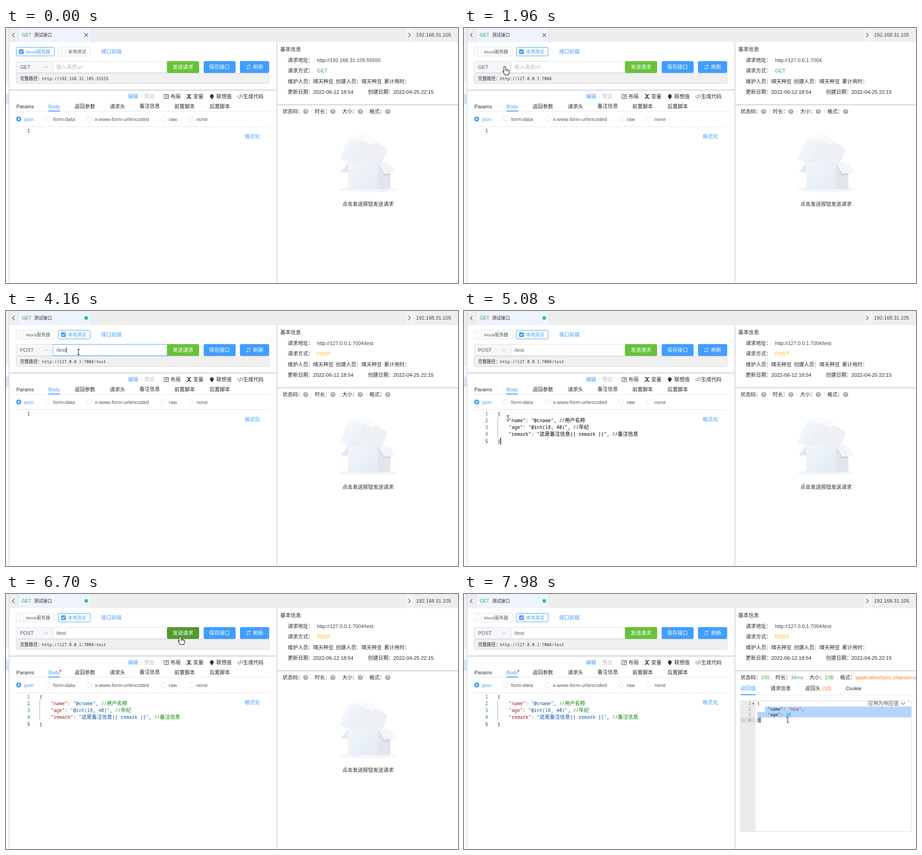
An HTML page for the animation above (8000 ms loop, 997 px wide and 562 px high).

```html
<!DOCTYPE html>
<html lang="zh">
<head>
<meta charset="utf-8">
<title>接口测试</title>
<style>
html, body { margin: 0; width: 100%; height: 100%; overflow: hidden; background: #fff; }
svg { display: block; width: 100vw; height: 100vh; }
text { font-family: "Liberation Sans", "Noto Sans CJK SC", "Noto Sans CJK", sans-serif; white-space: pre; }
.mono { font-family: "Noto Sans Mono", "Liberation Mono", "Noto Sans CJK SC", "Noto Sans CJK", monospace; }
.k { fill: #a31515; } .s { fill: #0451a5; } .c { fill: #008000; } .num { fill: #1c7fc4; }
.plain tspan { fill: #000; }
</style>
</head>
<body>
<svg id="stage" viewBox="0 0 997 562" preserveAspectRatio="none"></svg>
<script>
const LOOP = 8000;
const BLUE = '#409eff', INK = '#26282b', GREY = '#56595f', PALE = '#c0c4cc', LINE = '#dcdfe6',
      GREEN = '#32a852', ORANGE = '#ff7a20', AMBER = '#fdb714';

// Markup helpers; text is placed by its vertical middle.
const text = (x, mid, str, fill = INK, size = 11.25, extra = '') =>
  `<text x="${x}" y="${mid + size * .36}" font-size="${size}" fill="${fill}" ${extra}>${str}</text>`;
const mono = (x, mid, str, fill, size, extra = '') => text(x, mid, str, fill, size, 'class="mono" ' + extra);
const rect = (x, y, w, h, fill, extra = '') =>
  `<rect x="${x}" y="${y}" width="${w}" height="${h}" fill="${fill}" ${extra}/>`;
const path = (d, stroke, width = 1, fill = 'none', extra = '') =>
  `<path d="${d}" stroke="${stroke}" stroke-width="${width}" fill="${fill}" ${extra}/>`;
const poly = (points, fill) => `<polygon points="${points}" fill="${fill}"/>`;
const circle = (x, y, r, fill, extra = '') => `<circle cx="${x}" cy="${y}" r="${r}" fill="${fill}" ${extra}/>`;
const group = (id, body) => `<g id="${id}">${body}</g>`;
const row = (mid, items) => items.map(([x, str, fill]) => text(x, mid, str, fill)).join('');
const bars = (mid, xs) => xs.map(x => path(`M${x} ${mid - 5}v10`, LINE)).join('');
const caret = (id, x, y, h, w = 1) => rect(x, y, w, h, '#000', `id="${id}"`);

// Code line: parts are [class, text]; wide characters get a larger size.
const code = (x, mid, parts, size = 10.3) => mono(x, mid, parts.map(([cls, str]) =>
  str.split(/([\u4e00-\u9fff]+)/).filter(Boolean).map(s =>
    `<tspan class="${cls}" ${/[\u4e00-\u9fff]/.test(s) ? 'font-size="11.25"' : ''}>${s}</tspan>`).join('')
).join(''), '#111', size);

const checkbox = (id, x, w, label, on) => group(id,
  rect(x + .5, 42.5, w, 19, '#fff', `rx="2" stroke="${on ? BLUE : LINE}"`) +
  rect(x + 7, 47.5, 9.5, 9.5, on ? BLUE : '#fff', `rx="1.5" stroke="${on ? BLUE : LINE}"`) +
  (on ? path(`M${x + 9} 52l2 2 3.6-4`, '#fff', 1.3) : '') +
  text(x + 22, 52, label, on ? BLUE : GREY, 9.9));

const radio = (x, label, on) =>
  circle(x, 200.5, 5.5, on ? BLUE : '#fff', on ? '' : `stroke="${LINE}"`) +
  (on ? circle(x, 200.5, 2, '#fff') : '') + text(x + 12, 200.5, label, on ? BLUE : GREY);

const button = (x, w, label, tx, fill, id = '') =>
  rect(x, 73, w, 26, fill, `rx="3" id="${id}"`) + text(tx, 86, label, '#fff', 11.4, 'font-weight="500"');

const help = x => circle(x, 184, 5.6, '#a3a8b0') +
  text(x, 184.2, '?', '#fff', 9, 'text-anchor="middle" font-weight="700"');

function header() {
  return rect(0, 0, 997, 31, '#eeeeef') + rect(27, 0, 160, 31, '#eff3fd') +
    path('M187.5 0V31M26.5 0V31', '#dcdfe8') +
    path('M18.5 11l-4.5 4.5 4.5 4.5', '#555', 1.2) +
    text(35, 15, 'GET', GREEN, 10, 'font-weight="500"') + text(62, 15, '测试接口', INK, 9.8) +
    group('closeTab', path('M173 11.5l8 8m0-8l-8 8', '#555', 1.1)) +
    group('dirtyTab', circle(177, 15.3, 4, '#2fc27b')) +
    rect(880, 0, 20, 31, '#f3f3f4') + path('M879.5 0V31', '#d9dbe0') + path('M887.5 11l4.5 4.5-4.5 4.5', '#555', 1.2) +
    text(904.5, 15.3, '192.168.31.105', '#444', 11.15) +
    rect(0, 0, 6, 120, '#f0f1f3') + rect(0, 145, 6, 23, '#d3e7fc') + path('M6.5 0V562', '#cfd3db', 1.4);
}

function requestBar() {
  return checkbox('mockOn', 22, 84, 'Mock服务器', true) + checkbox('mockOff', 22, 84, 'Mock服务器', false) +
    checkbox('localOff', 115, 70, '本地测试', false) + checkbox('localOn', 115, 70, '本地测试', true) +
    text(210, 52, '接口前缀', BLUE) +
    rect(22.5, 99.5, 558, 23, '#f0f0f0', 'rx="3" stroke="#d5d8dd"') +
    text(31, 112, '完整路径：', INK, 9.7) + mono(79.5, 112, '', '#333', 9.05, 'id="fullPath"') +
    rect(103.5, 73.5, 252, 25, '#fff', `id="urlBox" stroke="${LINE}"`) +
    rect(22.5, 73.5, 80.5, 25, '#f5f7fa', `id="methodBox" rx="2" stroke="${LINE}"`) +
    text(31, 86, '', GREY, 11, 'id="method"') + path('M84.5 84l4 4 4-4', PALE, 1.1) +
    text(111, 86, '输入请求url', '#b4b8c0', 11.25, 'id="hint"') + text(111, 86, '', GREY, 11.25, 'id="url"') +
    caret('urlCaret', 111, 80, 12) +
    button(355, 71, '发送请求', 367.5, '#67c23a', 'send') + button(436, 70.5, '保存接口', 448, BLUE) +
    button(516, 64.5, '刷新', 545, BLUE) +
    path('M531 85a4 4 0 0 1 7-1.6m.4-2.2v2.6h-2.6M538.6 87a4 4 0 0 1-7 1.6m-.4 2.2v-2.6h2.6', '#fff');
}

function toolbar() {
  return row(151, [[269, '编辑', BLUE], [305, '预览', '#b8bcc4'], [363, '布局'], [413, '变量'], [464, '联想值'], [523, '生成代码']]) +
    bars(151, [298.5]) + path('M348.5 146.5h10v9h-10zM353 146.5v9M353 150h5.5', '#444') +
    path('M399.5 147q3-1.5 3.5 1l1.5 5q1 3 4 1M408.5 147q-2-1-4 2l-2 4q-2 3-4 2', '#222', 1.7) +
    path('M454 146a4.3 4.3 0 0 1 2 8v2h-4v-2a4.3 4.3 0 0 1 2-8z', 'none', 0, '#333') +
    path('M514 147.5l-3 3.5 3 3.5M519.5 147.5l3 3.5-3 3.5M518 146l-2.5 10', '#444') +
    path('M22 183.5H580.5', '#e4e7ed') + rect(93.5, 182, 25.5, 2, BLUE) +
    row(173, [[23, 'Params'], [93.5, 'Body', BLUE], [151.5, '返回参数'], [229, '请求头'], [371.5, '前置脚本'], [449, '后置脚本']]) +
    text(294.5, 172, '备注信息') + group('bodyDot', circle(120, 169, 2.3, '#f56c6c')) +
    radio(28, 'json', true) + radio(92, 'form-data') + radio(184, 'x-www-form-urlencoded') + radio(347, 'raw') + radio(408, 'none') +
    path('M22 217.5H580.5', '#cfcfcf', 1, 'none', 'stroke-dasharray="3 2"') + text(526.5, 239, '格式化', BLUE);
}

const lineMid = n => 226 + 15.2 * (n - 1);

function bodyCode() {
  const lines = [
    [['', '{']],
    [['k', '    "name"'], ['', ': '], ['s', '"@cname"'], ['', ', '], ['c', '//用户名称']],
    [['k', '    "age"'], ['', ': '], ['s', '"@int(18, 40)"'], ['', ', '], ['c', '//年纪']],
    [['k', '    "remark"'], ['', ': '], ['s', '"这是备注信息{{ remark }}"'], ['', ', '], ['c', '//备注信息']],
    [['', '}']]
  ];
  return mono(46.8, 226, '1', '#0b216f', 10.3, 'id="firstNo"') +
    group('body', lines.map((parts, i) => code(74, lineMid(i + 1), parts) +
      (i ? mono(46.8, lineMid(i + 1), i + 1, i === 4 ? '#0b216f' : '#237893', 10.3) : '')).join('') +
      path('M74.5 233.5V279', '#a5a5a5')) +
    caret('bodyCaret', 74, 219, 15, 1.5);
}

function info() {
  const who = '晴天种豆';
  return path('M7 136.7H597M598 169.3H997', '#cbd0d7', 2) + path('M597.5 31V562', '#cbd0d7', 1.6) +
    text(605, 47, '基本信息', INK, 11.4, 'font-weight="500"') +
    text(621.5, 71, '请求地址：') + text(686, 71, '', '#444', 11.25, 'id="address"') +
    text(621.5, 94, '请求方式：') + text(686, 94, '', GREEN, 11.25, 'id="verb"') +
    row(117.5, [[621.5, '维护人员：'], [677.5, who], [727.5, '创建人员：'], [784, who], [834, '累计用时：']]) +
    row(141, [[621.5, '更新日期：'], [677.5, '2022-06-12 18:54'], [798.5, '创建日期：'], [854.5, '2022-04-25 22:15']]);
}

function emptyState() {
  return group('empty',
    row(184, [[610, '状态码：'], [681, '时长：'], [741.5, '大小：'], [801.5, '格式：']]) +
    bars(184, [674, 735, 795]) + [661, 721, 781.5, 842].map(help).join('') +
    '<ellipse cx="798" cy="356" rx="63" ry="6" fill="#f3f5f9"/>' +
    poly('757,243 778,235 800,236 815,245 812,262 785,247', '#f9fafc') +
    poly('736,289 748,257 757,243 785,247 776,297 757,297', 'url(#lid)') +
    poly('785,247 809,259 814,250 838,264 841,272 830,297 776,297', '#eef0f5') +
    poly('755,297 738,318 755,319', '#e6e9ef') + poly('755,297 821,297 821,355 755,355', 'url(#front)') +
    poly('821,297 848,318 848,355 821,355', '#e2e5eb') + poly('821,297 848,319 848,324 833,326', '#d3d7df') +
    poly('821,297 845,297 861,318 834,321', '#f4f5f8') +
    text(742, 387.5, '点击发送按钮发送请求', INK, 11.3));
}

const REPLY = { x: 646.5, top: 236, step: 12, char: 5.75, size: 9.58, lens: [1, 18, 13, 1] };

function reply() {
  const { x, top, step, size } = REPLY;
  const rowTop = n => top + step * (n - 1), mid = n => rowTop(n) + step / 2;
  const lines = [
    [['', '{']], [['', '    "name": '], ['k', '"nia"'], ['', ',']], [['', '    "age": '], ['num', '20']], [['', '}']]
  ];
  return group('reply',
    row(184, [[610, '状态码：'], [655, '200', GREEN], [687, '时长：'], [721, '34ms', GREEN], [762, '大小：'],
      [796, '23B', GREEN], [829.5, '格式：'], [863, 'application/json; charset=utf-8', ORANGE]]) +
    bars(184, [680, 755, 823]) +
    row(208, [[610, '返回值', BLUE], [676, '请求信息'], [752.5, '返回头'], [790, '(10)', ORANGE], [842, 'Cookie']]) +
    path('M610 222.5H987', '#e4e7ed') + rect(610, 221, 33, 2, BLUE) +
    rect(610.5, 235.5, 376.5, 288, '#fff', 'rx="2" stroke="#d4d7de"') + rect(611, 236, 32, 287, '#ebebeb') +
    rect(611, top, 32, step, '#dadada', 'id="activeLine"') +
    lines.map((parts, i) => rect(0, rowTop(i + 1), 0, step, '#b5d5ff', `id="mark${i + 1}"`) +
      mono(633, mid(i + 1), i + 1, '#888', size, 'text-anchor="end"') + code(x, mid(i + 1), parts, size)).join('') +
    poly('635.5,240.5 640.5,240.5 638,244', '#666') +
    text(891, 241, '应用为响应值', GREY, 11.3) + path('M964 239l4.5 4.5 4.5-4.5', '#666', 1.1) +
    caret('replyCaret', 0, 0, step, 1.5));
}

function overlays() {
  const card = 'rx="3" stroke="#e4e7ed" filter="url(#shade)"';
  const items = ['GET', 'POST', 'PUT', 'DELETE', 'PATCH'];
  return group('tip', rect(132, 9, 105, 25, '#fff', card) + text(138.5, 21.5, 'http://127.0.0.1:7004', GREY, 10)) +
    group('menu', rect(23, 111, 93, 173, '#fff', card) + poly('57,111.5 62.5,105.5 68,111.5', '#fff') +
      rect(23.5, 0, 92, 33, '#f5f7fa', 'id="menuHover"') +
      items.map((s, i) => text(36, 133 + 33 * i, s, i ? GREY : BLUE, 11)).join('')) +
    group('hand', path('M0 0c1.6 0 2 1 2 2v5l1.5-.5 1.5.8 1.7-.2 1.2 1.2c2 0 2.2 1 2.2 3 0 3-1.6 4-1.6 7.2H0c0-2-3.5-5-4.2-7.5-.4-1.5 1-2 2.2-.6V2C-2 1-1.6 0 0 0z', '#111', 1.1, '#fff') +
      path('M2.2 8v2.5M5 8v2.5M7.6 8.5v2', '#111', .9)) +
    group('arrow', path('M0 0v15l3.5-3.2 2.3 5.4 2.3-1-2.3-5.2h5z', '#111', 1, '#fff')) +
    group('beam', path('M-2.5-5.5h2l.5.5.5-.5h2M0-5V5.5M-2.5 6h2l.5-.5.5.5h2', '#111', 1.1));
}

const defs = `<defs>
  <linearGradient id="lid" x2="1" y2="1"><stop stop-color="#fafbfd"/><stop offset=".55" stop-color="#edf4fa"/><stop offset="1" stop-color="#e9ecf2"/></linearGradient>
  <linearGradient id="front" x2="1" y2="1"><stop stop-color="#f4f6f9"/><stop offset=".5" stop-color="#e9f1f8"/><stop offset="1" stop-color="#e6e9f0"/></linearGradient>
  <filter id="shade" x="-20%" y="-40%" width="140%" height="180%"><feDropShadow dx="0" dy="1" stdDeviation="4" flood-opacity=".12"/></filter></defs>`;
const stage = document.getElementById('stage');
stage.innerHTML = defs + rect(0, 0, 997, 562, '#fff') + header() + requestBar() + toolbar() + bodyCode() +
  info() + emptyState() + reply() + overlays();

const el = {};
stage.querySelectorAll('[id]').forEach(node => { el[node.id] = node; });
const show = (id, on) => el[id].setAttribute('opacity', +on);
const put = (id, attrs) => { for (const key in attrs) el[id].setAttribute(key, attrs[key]); };
const write = (id, str) => { if (el[id].textContent !== str) el[id].textContent = str; };
const ramp = (t, from, to) => Math.min(1, Math.max(0, (t - from) / (to - from)));
const blink = (t, since) => Math.floor((t - since) / 500) % 2 === 0;

// Pointer stops: time, x, y, shape from here on.
const MOVES = [
  [0, 1010, 30, 'arrow'], [80, 1010, 30, 'arrow'], [100, 994, 37, 'arrow'], [260, 994, 37, 'arrow'],
  [320, 965, 50, 'arrow'], [400, 898, 66, 'arrow'], [500, 760, 86, 'arrow'], [600, 590, 106, 'arrow'],
  [720, 370, 112, 'arrow'], [820, 220, 106, 'arrow'], [900, 118, 82, 'beam'], [950, 116, 70, 'arrow'],
  [980, 138, 60, 'hand'], [1020, 157, 58, 'hand'], [1700, 157, 58, 'hand'], [1800, 130, 67, 'arrow'],
  [1880, 100, 79, 'hand'], [1960, 90, 85, 'hand'], [2280, 90, 85, 'hand'], [2400, 84, 115, 'hand'],
  [2600, 78, 160, 'hand'], [2800, 78, 160, 'arrow'], [2880, 115, 122, 'arrow'], [2930, 144, 99, 'beam'],
  [2980, 160, 90, 'beam'], [3280, 160, 90, ''], [4160, 160, 90, 'beam'], [4280, 160, 105, 'arrow'],
  [4460, 136, 170, 'arrow'], [4580, 110, 217, 'beam'], [4700, 97, 236, 'beam'], [5460, 97, 236, 'beam'],
  [5700, 200, 235, 'beam'], [5860, 295, 217, 'arrow'], [6060, 344, 170, 'arrow'], [6180, 372, 130, 'arrow'],
  [6260, 382, 104, 'arrow'], [6420, 384, 100, 'arrow'], [6580, 384, 98, 'hand'], [6660, 384, 93, 'hand'],
  [7180, 384, 93, 'hand'], [7240, 426, 112, 'arrow'], [7380, 560, 192, 'arrow'], [7480, 642, 246, 'beam'],
  [7560, 663, 254, 'beam'], [7660, 663, 254, 'beam'], [7820, 690, 265, 'beam'], [7960, 714, 277, 'beam'],
  [LOOP, 714, 277, 'beam']
];

function pointer(t) {
  const i = Math.max(1, MOVES.findIndex(m => m[0] > t));
  const [t0, x0, y0, shape] = MOVES[i - 1], [t1, x1, y1] = MOVES[i], p = ramp(t, t0, t1);
  return { x: x0 + (x1 - x0) * p, y: y0 + (y1 - y0) * p, shape };
}

const KEYS = [[3320, '/'], [3420, '/t'], [3640, '/te'], [3780, '/tes'], [3900, '/test']];

// Drag selection in the reply follows the pointer.
function select(t, at) {
  const { x, top, step, char, lens } = REPLY;
  const picking = t >= 7620;
  const line = picking ? Math.min(4, Math.max(2, Math.floor((at.y - top) / step) + 1)) : 1;
  const head = x + char * Math.min(lens[line - 1], Math.round((at.x - x) / char));
  const y = top + step * (line - 1);
  put('activeLine', { y });
  put('replyCaret', { x: head, y });
  show('replyCaret', picking);
  for (let n = 1; n <= 4; n++) {
    const from = n === 2 ? x + 3 * char : x, to = n < line ? 986.5 : head;
    const on = picking && n >= 2 && n <= line;
    put('mark' + n, { x: from, width: on ? Math.max(0, to - from) : 0 });
  }
}

function draw(t) {
  const local = t >= 1380, post = t >= 2760, pasted = t >= 5080, done = t >= 7000;
  const typed = KEYS.reduce((s, [at, str]) => t >= at ? str : s, '');
  const address = 'http://' + (local ? '127.0.0.1:7004' : '192.168.31.105:55555') + typed;
  const method = post ? 'POST' : 'GET';
  const at = pointer(t);

  const swap = ramp(t, 1360, 1440);
  show('mockOn', 1 - swap); show('mockOff', swap);
  show('localOff', 1 - swap); show('localOn', swap);
  show('tip', ramp(t, 1110, 1180) * (1 - ramp(t, 1700, 1840)));
  write('fullPath', address); write('address', address);

  write('method', method); write('verb', method);
  put('verb', { fill: post ? AMBER : GREEN });
  put('methodBox', { stroke: t >= 2120 && t < 3200 ? BLUE : LINE });
  show('menu', ramp(t, 2120, 2320) * (1 - ramp(t, 2770, 2940)));
  const item = Math.max(0, Math.min(4, Math.floor((at.y - 117) / 33)));
  put('menuHover', { y: 117 + 33 * item });
  show('closeTab', !post); show('dirtyTab', post);

  const editing = t >= 3200 && t < 4700;
  put('urlBox', { stroke: editing ? BLUE : LINE });
  write('url', typed); show('hint', !typed);
  put('urlCaret', { x: 111.5 + (typed ? el.url.getComputedTextLength() : 0) });
  show('urlCaret', editing && blink(t, t < 3900 ? 3200 : 3900));

  show('body', pasted); show('bodyDot', t >= 5200);
  put('firstNo', { fill: pasted ? '#237893' : '#0b216f' });
  el.body.classList.toggle('plain', t < 5140);
  put('bodyCaret', { x: pasted ? 80 : 74, y: pasted ? 279.5 : 219 });
  show('bodyCaret', t >= 4700 && t < 6700 && blink(t, pasted ? 5080 : 4700));

  put('send', { fill: t >= 6600 && t < 7220 ? '#529b2e' : '#67c23a' });
  show('empty', !done); show('reply', done);
  select(t, at);

  for (const shape of ['hand', 'arrow', 'beam']) {
    show(shape, shape === at.shape);
    put(shape, { transform: `translate(${at.x.toFixed(1)} ${at.y.toFixed(1)})` });
  }
}

function tick() {
  draw(performance.now() % LOOP);
  requestAnimationFrame(tick);
}
tick();
</script>
</body>
</html>
```
